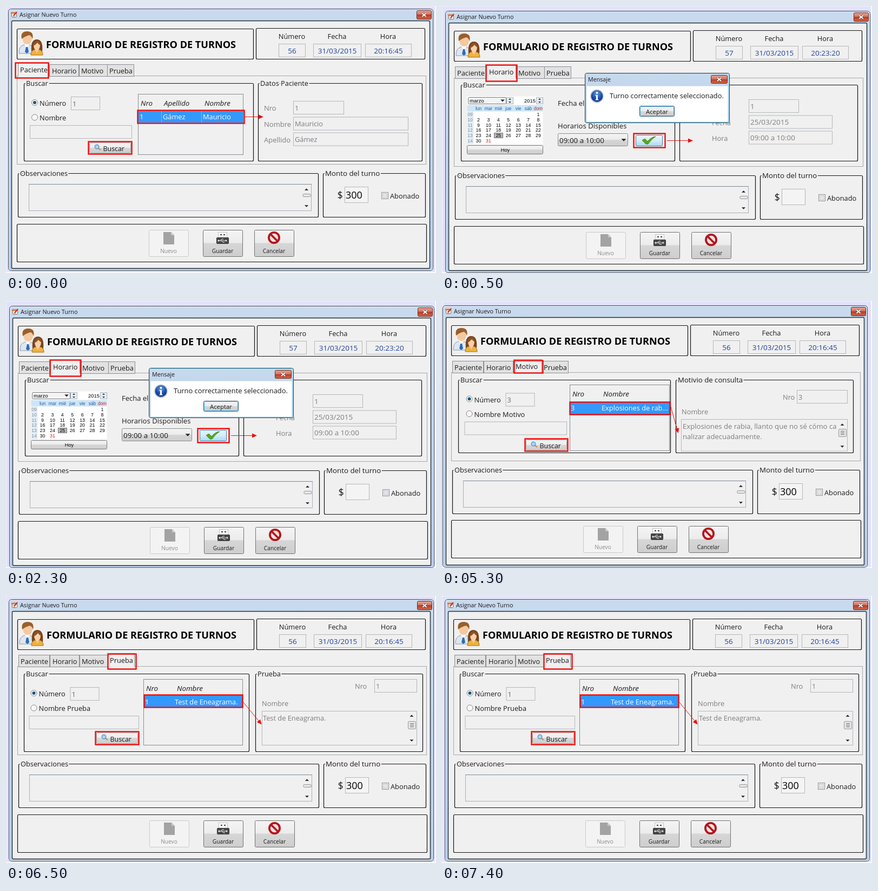
An HTML page for the animation above (8000 ms loop, 795 by 495 pixels).

```html
<!DOCTYPE html>
<html lang="es">
<head>
<meta charset="utf-8">
<title>Asignar Nuevo Turno</title>
<style>
html, body { margin: 0; width: 100%; height: 100%; overflow: hidden; background: #fff; }
svg { display: block; width: 795px; height: 495px; }
text { font-family: "Open Sans", "Noto Sans", sans-serif; white-space: pre; }
.cal text { font-family: "Liberation Sans", Arial, sans-serif; }
.legend { paint-order: stroke; stroke: #f0f0f0; stroke-width: 5px; }
</style>
</head>
<body>
<svg id="stage" viewBox="0 0 795 495">
  <defs>
    <linearGradient id="bar" x2="0" y2="1">
      <stop offset="0" stop-color="#c9daee"/><stop offset="1" stop-color="#b3cbe8"/>
    </linearGradient>
    <linearGradient id="close" x2="0" y2="1">
      <stop offset="0" stop-color="#e5a596"/><stop offset=".48" stop-color="#d0705c"/>
      <stop offset=".5" stop-color="#b93c25"/><stop offset="1" stop-color="#d0684a"/>
    </linearGradient>
    <linearGradient id="btn" x2="0" y2="1">
      <stop offset="0" stop-color="#f4f4f4"/><stop offset=".48" stop-color="#ececec"/>
      <stop offset=".5" stop-color="#d6d6d6"/><stop offset="1" stop-color="#cecece"/>
    </linearGradient>
    <linearGradient id="hot" x2="0" y2="1">
      <stop offset="0" stop-color="#eaf6fd"/><stop offset=".5" stop-color="#d3ecfa"/>
      <stop offset="1" stop-color="#a8d8f2"/>
    </linearGradient>
    <radialGradient id="info" cy=".3">
      <stop offset="0" stop-color="#5c9be8"/><stop offset="1" stop-color="#123f9c"/>
    </radialGradient>
  </defs>
</svg>
<script>
const FACE = '#f0f0f0', INK = '#1a1a1a', DIM = '#7d7d7d', EDGE = '#b4b6bb', RED = '#f00a0a', NAVY = '#1f429c';
const LOOP = 8000;

// Boxes are given by their left, top, right and bottom edges.
const box = (l, t, r, b, fill = FACE, stroke = 'none', rx = 0, w = 1) =>
  `<rect x="${l + .5}" y="${t + .5}" width="${r - l}" height="${b - t}" rx="${rx}" fill="${fill}" stroke="${stroke}" stroke-width="${w}"/>`;
const text = (x, y, s, fill = INK, size = 12.8, more = '') =>
  `<text x="${x}" y="${y}" fill="${fill}" font-size="${size}" ${more}>${s}</text>`;
const mid = (x, y, s, fill, size) => text(x, y, s, fill, size, 'text-anchor="middle"');
const italic = (x, y, s) => text(x, y, s, INK, 13.4, 'font-style="italic"');
const path = (d, fill, stroke = 'none', w = 1) =>
  `<path d="${d}" fill="${fill}" stroke="${stroke}" stroke-width="${w}"/>`;
const dot = (x, y, r, fill, stroke = 'none', w = 1) =>
  `<circle cx="${x}" cy="${y}" r="${r}" fill="${fill}" stroke="${stroke}" stroke-width="${w}"/>`;
const shift = (x, y, s) => `<g transform="translate(${x} ${y})">${s}</g>`;

const panel = (l, t, r, b) => box(l, t, r, b, 'none', '#111', 2, 1.2);
const group = (l, t, r, b, label, size = 12.8) =>
  panel(l, t, r, b) + text(l + 4, t + 4.5, label, INK, size, 'class="legend"');
const field = (l, t, r, b, s = '', fill = DIM, size) =>
  box(l, t, r, b, FACE, EDGE) + text(l + 3, b - 6.5, s, fill, size);
const mark = (l, t, r, b) => box(l, t, r, b, 'none', RED, 0, 2.4);
const tri = (x, y, h, dir) => path(`M${x - h} ${y - dir * h / 2}h${2 * h}l${-h} ${dir * h}z`, '#222');
const radio = (x, y, on) => dot(x, y, 5.5, '#f8f8f8', '#858585') + (on ? dot(x, y, 3, '#17587f') : '');

function arrow(x1, y1, x2, y2) {
  const turn = Math.atan2(y2 - y1, x2 - x1) * 180 / Math.PI;
  return path(`M${x1} ${y1}L${x2} ${y2}`, 'none', '#e01818') +
    `<g transform="translate(${x2} ${y2}) rotate(${turn})">${path('M1 0l-9 -4v8z', RED)}</g>`;
}

const closeBox = (l, t, r, b) => {
  const x = (l + r) / 2 + .5, y = (t + b) / 2 + .5;
  const cross = `M${x - 3.5} ${y - 3}l7 6m0 -6l-7 6`;
  return box(l, t, r, b, 'url(#close)', '#6d2a22', 2) +
    path(cross, 'none', '#63333b', 3.6) + path(cross, 'none', '#fff', 2.2);
};

function scroller(x, top, bottom, thumbTop, thumbBottom) {
  return tri(x, top, 3.5, -1) + tri(x, bottom, 3.5, 1) +
    box(x - 7, thumbTop, x + 7, thumbBottom, '#e6e6e6', '#979797', 1.5);
}

const grip = (x, y) => path(`M${x - 3} ${y - 3}h7m-7 3h7m-7 3h7`, 'none', '#666');

function searchButton(l, t, r, b) {
  const x = l + 16, y = t + 10;
  return box(l + 2, t + 2, r - 2, b - 2, 'url(#btn)', '#aaa', 2) +
    path(`M${x + 2} ${y + 2}l5 4`, 'none', '#c08a4a', 2.2) +
    dot(x, y, 3.8, '#a9d5f5', '#5d93c8', 1.4) +
    text(l + 27.5, b - 5.5, 'Buscar', INK, 12.4) + mark(l, t, r, b);
}

const people =
  path('M24 88q-1 -13 9 -16h10q10 3 10 16z', '#dfe6ef', '#8b99ab') +
  path('M34 72l4 5 5 -5 -2 -3h-5z', '#fff') + path('M37 76h3l2 9 -3.500 3 -3.500 -3z', '#2a6db8') +
  path('M30 56q0 -8 9 -8t9 8q0 15 -9 15t-9 -15z', '#f4c9a0') +
  path('M29 61q-3 -14 10 -14t10 14q-2 -6 -6 -7 -8 2 -14 7z', '#9a5f2a') +
  path('M47 84q-2 -22 10 -22t10 22q-10 6 -20 0z', '#7a431c') +
  path('M46 91q0 -9 7 -10h8q7 1 7 10z', '#eeb23e', '#a8701d') +
  path('M53 80l4 7 4 -7z', '#f4c9a0') +
  path('M51 71q1 -5 6 -5t6 5q0 11 -6 11t-6 -11z', '#f7d0aa') +
  path('M50 74q0 -9 8 -10 6 1 6 9 -4 -2 -6 -5 -3 4 -8 6z', '#8f5223');

const appIcon =
  box(10, 12, 19, 20, '#fff', '#7b6a5a', 1) + path('M9 11.500h11v3h-11z', '#d8772e') +
  path('M12 17h5m-5 2h4', 'none', '#9aa') + path('M14 18l6 -7', 'none', '#c8281e', 2);

const tabs = [['Paciente', 22, 79, 26], ['Horario', 80, 134, 85], ['Motivo', 135, 187, 139], ['Prueba', 187, 236, 191]];

function tabRow(active) {
  const one = ([name, l, r, x], i) => {
    const on = i === active;
    return box(l, on ? 105 : 108, r, 130, on ? FACE : '#e2e2e2', '#8c8e94') +
      (on ? box(l, 129, r, 131) : '') + text(x, on ? 122.5 : 124.5, name);
  };
  return tabs.map(one).join('');
}

function footer() {
  const button = (l, label, live) =>
    box(l, 415, l + 73, 464, live ? 'url(#btn)' : '#f3f3f3', live ? '#707070' : '#c9c9c9', 2) +
    mid(l + 36.5, 458, label, live ? INK : '#8c8c8c', 10.2);
  return panel(20, 404, 777, 474) +
    button(264, 'Nuevo', false) + path('M291 419h14l6 6v17h-20z', '#a3a3a3') + path('M305 419v6h6z', '#c9c9c9') +
    button(364, 'Guardar', true) + box(392, 419, 408, 429, '#f8f8f8', '#c4c4c4') +
    path('M396 423h3v2h-3zm6 0h3v2h-3z', '#444') + box(389, 429, 411, 440, '#484848', '#333', 1) +
    path('M393 435h13m-10 0l3 -3h3m-4 3l3 3h3', 'none', '#eee') + dot(393, 435, 1.6, '#eee') +
    path('M406 433l3 2 -3 2z', '#eee') +
    button(459, 'Cancelar', true) +
    dot(495.5, 429.5, 9.6, '#f4e3e3', '#b5161c', 3.8) + path('M489 423l13 13', 'none', '#b5161c', 3.8);
}

// Everything that all four tabs share.
function windowFrame({ number, time, price, tab, footY = 0 }) {
  const head = (l, r, label, value) => mid((l + r) / 2, 61, label) +
    box(l, 70, r, 94, FACE, EDGE) + mid((l + r) / 2 + .5, 88, value, NAVY, 13.5);
  return box(4, 5, 789, 490, 'url(#bar)', '#37424f', 5) +
    box(5, 6, 788, 489, 'none', '#e6f0fa', 4) +
    box(10, 27, 783, 486, FACE, '#25303b', 2, 1.4) +
    appIcon + text(25, 20, 'Asignar Nuevo Turno', INK, 10.8) + closeBox(759, 8, 786, 24) +
    panel(20, 42, 457, 98) + people +
    text(74, 78, 'FORMULARIO DE REGISTRO DE TURNOS', '#000', 18.1, 'font-weight="700"') +
    panel(462, 41, 774, 98) +
    head(504, 553, 'Número', number) + head(568, 656, 'Fecha', '31/03/2015') + head(664, 749, 'Hora', time) +
    box(20, 129, 776, 293, FACE, '#a5a7ad') + tabRow(tab) +
    group(22, 310, 577, 391, 'Observaciones') + box(42, 330, 564, 379, FACE, '#a9aeb8') +
    path('M42 330.500h523', 'none', '#7d8796') + scroller(555.5, 340, 371, 348, 353) +
    group(586, 310, 775, 391, 'Monto del turno', 13.3) + text(612.5, 357, '$', INK, 18) +
    box(626, 335, 669, 364, '#f4f4f4', EDGE) + text(628, 357, price, '#000', 18) +
    box(694, 345, 706, 357, '#f6f6f6', '#8e8f8f') + box(696, 347, 704, 355, '#e2e4e8', '#c2c6cc') +
    text(710, 357, 'Abonado') + shift(0, footY, footer());
}

function list(l, t, r, b, heads, headY, row, cells, rowY, cuts) {
  return box(l, t, r, b, FACE, '#858a93') +
    heads.map(([x, s]) => italic(x, headY, s)).join('') +
    box(l, row[0], r, row[1], '#3399ff') +
    cuts.map(x => path(`M${x}.5 ${row[0]}V${row[1]}`, 'none', '#85b9e8')).join('') +
    cells.map(([x, s]) => text(x, rowY, s, '#fff')).join('');
}

function finder(x, y, option, value, wide) {
  return radio(x, y, true) + text(x + 9, y + 6, 'Número') +
    radio(x, y + 27.5) + text(x + 9, y + 33, option) +
    field(x + 67, y - 11, x + 120, y + 13, value, '#666') +
    box(x - 9, y + 42, wide, y + 66, FACE, EDGE);
}

function patientTab() {
  const row = (y, label, r, value) => text(477, y, label, DIM, 13) + field(531, y - 18, r, y + 6, value);
  return group(33, 143, 457, 287, 'Buscar') + finder(53, 179, 'Nombre', '1', 232) +
    searchButton(152, 251, 232, 274) +
    list(244, 163, 438, 275, [[249, 'Nro'], [292, 'Apellido'], [367, 'Nombre']], 185,
      [194, 216], [[247, '1'], [290, 'Gámez'], [364, 'Mauricio']], 210, [287, 361]) +
    mark(243, 193, 440, 217) +
    group(466, 143, 769, 287, 'Datos Paciente') +
    row(194, 'Nro', 624, '1') + row(223.5, 'Nombre', 743, 'Mauricio') + row(252.5, 'Apellido', 743, 'Gámez') +
    mark(17, 105, 78, 133) + arrow(442, 205.5, 475, 205.5);
}

function calendar() {
  const colX = c => 67.5 + c * 18.4, rowY = r => 204 + r * 9.8;
  const spin = x => box(x, 169, x + 12, 181, '#e8edf3', '#a8b4c4') + tri(x + 6.5, 172.5, 2.5, -1) + tri(x + 6.5, 178.5, 2.5, 1);
  let s = box(46, 167, 186, 256, '#fff') + box(46, 183, 186, 195, '#cfe5f5') + box(46, 195, 58, 256, '#e3eef6') +
    box(48, 169, 118, 181, '#f4f4f4', '#777', 1) + text(51, 179, 'marzo', '#000', 9.6) + tri(112, 175.5, 3.8, 1) +
    spin(119) + text(152, 179, '2015', '#000', 9.4) + spin(174);
  ['lun', 'mar', 'mié', 'jue', 'vie', 'sáb', 'dom'].forEach((d, c) => {
    s += mid(colX(c), 193, d, c === 6 ? '#c0281e' : '#1c5fa8', 8.4);
  });
  for (let w = 0; w < 6; w++) s += mid(52, rowY(w), w < 1 ? '09' : 9 + w, '#7f8c96', 8.6);
  s += box(96, 235, 112, 244, '#b8b8b8', '#777');
  for (let d = 1; d <= 31; d++) {
    s += mid(colX((d + 5) % 7), rowY(Math.floor((d + 5) / 7)), d, d === 31 ? '#d01818' : '#000', 8.8);
  }
  s += box(46, 258, 186, 274, 'url(#btn)', '#777', 2) + mid(117, 270, 'Hoy', '#000', 9.2);
  return `<g class="cal">${s}</g>`;
}

function message() {
  return box(264, 124, 531, 216, 'url(#bar)', '#2b4458', 3) + box(265, 125, 530, 215, 'none', '#7fd3ea', 2) +
    box(267, 148, 528, 214, '#fff') +
    text(270, 140, 'Mensaje', INK, 10.7) + closeBox(497, 128, 527, 143) +
    dot(286.5, 167, 11.5, 'url(#info)', '#b4bccb', 1.6) +
    dot(286.5, 161, 1.9, '#fff') + path('M283.500 165h4.500v8h1.500v1.500h-6v-1.500h1.500v-6.500h-1.500z', '#fff') +
    text(310, 171, 'Turno correctamente seleccionado.', INK, 12.85) +
    box(365, 185, 429, 204, 'url(#hot)', '#3c5f7d', 2) + box(366, 186, 428, 203, 'url(#btn)', '#4fc0ee', 1) +
    mid(397.5, 199.5, 'Aceptar', INK, 11.4);
}

function scheduleTab() {
  const row = (y, label, r, value) => text(499, y, label, DIM) + field(567, y - 18, r, y + 6, value, DIM, 13.4);
  return group(35, 146, 430, 287, 'Buscar') + calendar() +
    text(214, 185, 'Fecha elegida', INK, 13) + text(214, 227, 'Horarios Disponibles', INK, 13.1) +
    box(214, 236, 343, 259, 'url(#btn)', '#8a8a8a', 2) + text(217, 253.5, '09:00 a 10:00', INK, 13.4) +
    tri(336, 248.5, 4.5, 1) +
    box(358, 239, 407, 259, 'url(#hot)', '#3c7fb1', 2) +
    path('M370 249l5 -3 5 5q8 -9 15 -9 -8 5 -14 14h-4z', '#57a81c', '#3c8412', .8) + mark(354, 236, 412, 262) +
    arrow(416, 249.5, 463, 249.5) +
    panel(439, 146, 768, 287) +
    row(191, 'Nro', 659, '1') + row(220.5, 'Fecha', 721, '25/03/2015') + row(249.5, 'Hora', 721, '09:00 a 10:00') +
    mark(81, 109, 138, 139) + message();
}

function reasonTab() {
  return group(30, 146, 422, 281, 'Buscar') + finder(50.5, 181.5, 'Nombre Motivo', '3', 230) +
    searchButton(153, 255, 232, 278) +
    list(236, 155, 420, 277, [[241, 'Nro'], [298, 'Nombre']], 177,
      [187, 211], [[238, '3'], [295, 'Explosiones de rab...']], 203, []) +
    mark(236, 187, 421, 210) +
    group(432, 146, 760, 281, 'Motivio de consulta', 13.2) +
    text(630, 183, 'Nro', DIM) + field(656, 165, 749, 189, '3') + text(443, 210, 'Nombre', DIM) +
    box(442, 219, 749, 278, FACE, EDGE) +
    text(445, 237, 'Explosiones de rabia, llanto que no sé cómo ca', DIM, 13.1) +
    text(445, 256, 'nalizar adecuadamente.', DIM, 13.1) +
    scroller(740, 229, 270, 237, 251) + grip(740, 244.5) +
    mark(133, 110, 186, 133) + arrow(422, 193, 436.5, 244);
}

function testTab() {
  return group(33, 144, 449, 288, 'Buscar') + finder(51.5, 180, 'Nombre Prueba', '1', 245) +
    searchButton(165, 251, 245, 275) +
    list(254, 154, 437, 276, [[259, 'Nro'], [316, 'Nombre']], 176,
      [183, 206], [[257, '1'], [312, 'Test de Eneagrama.']], 201, []) +
    mark(255, 183, 437, 206) +
    group(461, 144, 770, 288, 'Prueba') +
    text(645, 172, 'Nro', DIM) + field(681, 154, 759, 178, '1') + text(473, 204, 'Nombre', DIM) +
    box(473, 213, 759, 276, FACE, EDGE) + text(475, 231, 'Test de Eneagrama.', DIM) +
    scroller(750, 222, 268, 232, 246) + grip(750, 239.5) +
    mark(188, 107, 240, 135) + arrow(438, 196, 472, 237.5);
}

const early = { number: '56', time: '20:16:45', price: '300' };
const scenes = [
  { from: 0, to: 500, x: 0, y: 0, body: patientTab, data: { ...early, tab: 0 } },
  { from: 500, to: 3500, x: 2, y: 4, body: scheduleTab, data: { number: '57', time: '20:23:20', price: '', tab: 1 } },
  { from: 3500, to: 6500, x: -3, y: 3, body: reasonTab, data: { ...early, tab: 2, footY: -1 } },
  { from: 6500, to: LOOP, x: 1, y: 1, body: testTab, data: { ...early, tab: 3 } }
];

const stage = document.getElementById('stage');
for (const { from, to, x, y, body, data } of scenes) {
  const g = document.createElementNS('http://www.w3.org/2000/svg', 'g');
  g.innerHTML = box(-1, -1, 796, 496, '#fff') + box(0, 0, 793, 493, '#e2e2fb') +
    shift(x, y, windowFrame(data)) + body();
  stage.append(g);
  const step = (opacity, at) => ({ opacity, offset: at / LOOP, easing: 'steps(1, end)' });
  const keys = [step(1, from), step(0, to)];
  if (from > 0) keys.unshift(step(0, 0));
  if (to < LOOP) keys.push(step(0, LOOP));
  g.animate(keys, { duration: LOOP, iterations: Infinity });
}
</script>
</body>
</html>
```
